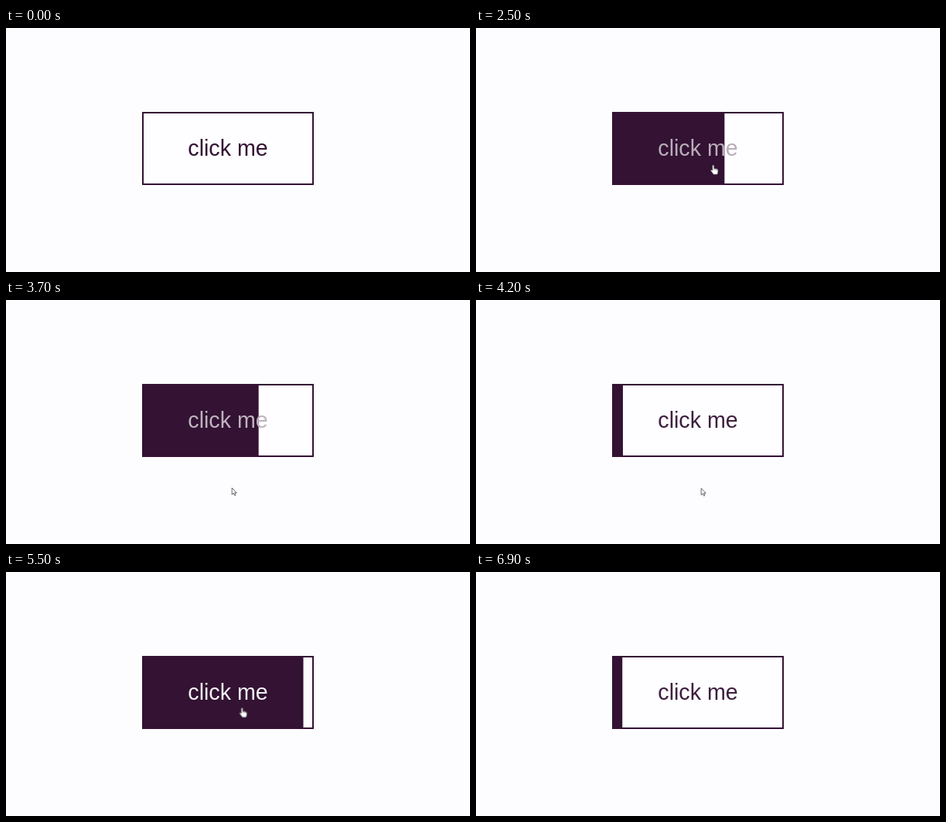
Animation of 600 by 317 pixels, one loop 7 s. Source, as an HTML page:

```html
<!DOCTYPE html>
<html lang="en">
<head>
<meta charset="utf-8">
<title>Button hover fill</title>
<style>
  :root { --t: 0; --ink: #331233; }
  html, body { margin: 0; width: 100%; height: 100%; overflow: hidden; background: #fdfcfe; }
  svg { display: block; }

  /* Paused and scrubbed through --t; 1% of a track is 100 ms. */
  .fill, .label, .cursor, .arrow, .hand {
    animation: 10s ease calc(var(--t) * -1ms) both paused;
  }
  .frame { fill: #fefdff; stroke: var(--ink); stroke-width: 2; }
  .fill { fill: var(--ink); animation-name: fill; }
  .label {
    font: 28.6px "Liberation Sans", Arial, sans-serif;
    text-anchor: middle;
    animation-name: label;
  }
  .cursor {
    fill: #fff; stroke: #453f47; stroke-width: .8; stroke-linejoin: round;
    animation-name: move;
    animation-timing-function: linear;
  }
  .arrow { animation-name: arrow; animation-timing-function: step-end; }
  .hand { animation-name: hand; animation-timing-function: step-end; }

  @keyframes fill {
    0%, 21.17%, 44.9%, 47.85%, 71.96%, 100% { width: 0; }
    31.17%, 34.9%, 57.85%, 61.46% { width: 218px; }
  }
  @keyframes label {
    0%, 21.17%, 44.9%, 47.85%, 71.96%, 100% { fill: #331233; }
    31.17%, 34.9%, 57.85%, 61.46% { fill: #fff; }
  }
  @keyframes move {
    0%, 17% { transform: translate(105.5px, 248px); }
    18% { transform: translate(124px, 262px); }
    19% { transform: translate(165px, 269px); }
    20% { transform: translate(216px, 255px); }
    21.17% { transform: translate(264px, 205px); }
    23% { transform: translate(301px, 184px); }
    25%, 33% { transform: translate(307px, 178px); }
    34.9% { transform: translate(302px, 205px); }
    36% { transform: translate(295px, 239px); }
    37% { transform: translate(292px, 244px); }
    40%, 44% { transform: translate(291px, 244.5px); }
    46% { transform: translate(295px, 238px); }
    47.85% { transform: translate(303px, 204px); }
    50%, 60% { transform: translate(305.5px, 176.5px); }
    61%, 100% { transform: translate(306px, 184px); }
  }
  @keyframes arrow {
    0%, 21.17%, 47.85%, 100% { opacity: 0; }
    17%, 34.9% { opacity: 1; }
  }
  @keyframes hand {
    0%, 34.9%, 61.46%, 100% { opacity: 0; }
    21.17%, 47.85% { opacity: 1; }
  }
</style>
</head>
<body>
<svg width="600" height="317" viewBox="0 0 600 317">
  <rect class="frame" x="177" y="110" width="220" height="93"/>
  <rect class="fill" x="178" y="111" width="0" height="91"/>
  <text class="label" x="287" y="166">click me</text>
  <g class="cursor">
    <path class="arrow" d="M.2 0V8.8L2.2 7 3.6 10 5 9.4 3.7 6.5H6.2Z"/>
    <g class="hand">
      <path d="M-1.3 1a1.1 1.1 0 0 1 2.2 0V4.3L4.8 5.1Q6 5.5 6 6.8V8.5Q6 10.5 5 12.3H0Q-1.5 10-3.4 7.6-3.6 6-2.2 6.3L-1.3 7.2Z"/>
      <path d="M.9 4.3V6.5M2.7 5V6.7M4.4 5.3V6.9" stroke-width=".5"/>
    </g>
  </g>
</svg>
<script>
  const LOOP = 7000, STEP = 100;
  const root = document.documentElement;
  const start = performance.now();

  // The picture advances ten times a second.
  function draw() {
    const t = (performance.now() - start) % LOOP;
    root.style.setProperty('--t', Math.floor(t / STEP) * STEP);
    requestAnimationFrame(draw);
  }
  draw();
</script>
</body>
</html>
```
